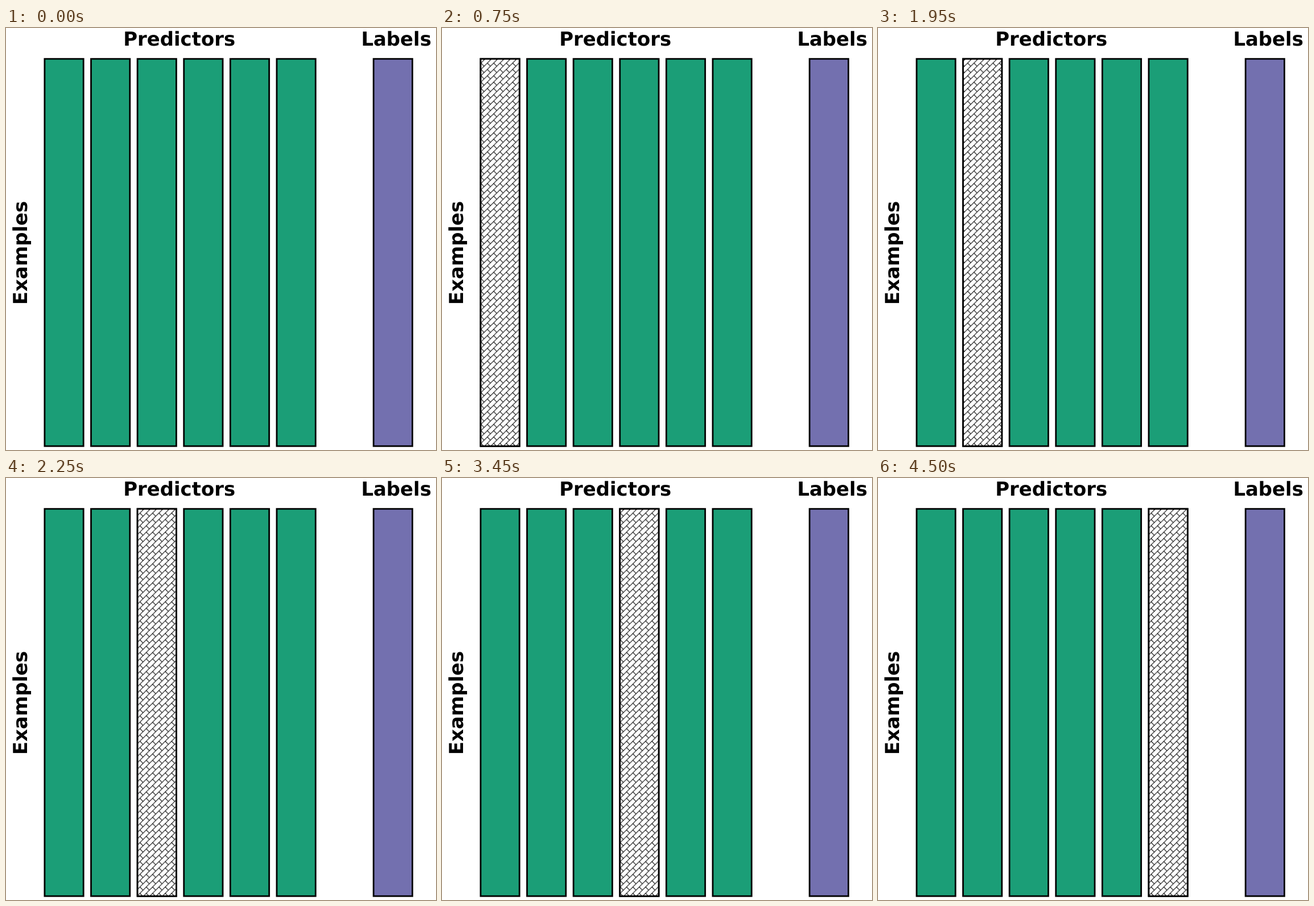
An HTML page for the animation above (5250 ms loop, 756 by 741 pixels).

```html
<!DOCTYPE html>
<html lang="en">
<head>
<meta charset="utf-8">
<title>Predictors and labels</title>
<style>
  html, body { margin: 0; width: 100%; height: 100%; overflow: hidden; background: #fff; }
  svg { display: block; width: 756px; height: 741px; }
  text { font: bold 33.9px "DejaVu Sans", sans-serif; text-rendering: geometricPrecision; }
  .bar { stroke: #000; stroke-width: 2.8; stroke-linejoin: miter; }
  .hatch { opacity: 0; }
</style>
</head>
<body>
<svg viewBox="0 0 756 741">
  <defs>
    <!-- Diagonal brick: full rising diagonal, half falling diagonal -->
    <pattern id="brick" width="8" height="8" patternUnits="userSpaceOnUse"
             patternTransform="translate(152 56) scale(1.391)">
      <rect width="8" height="8" fill="#fff"/>
      <path d="M-1 9L9 -1M-1 1L1 -1M7 9L9 7M4 4L8 8" fill="none" stroke="#000" stroke-width=".8"/>
    </pattern>
  </defs>
  <text x="206.2" y="30.8">Predictors</text>
  <text x="624.4" y="30.8">Labels</text>
  <text transform="translate(36.8 486) rotate(-90)">Examples</text>
  <g id="bars"></g>
</svg>
<script>
  const STEP = 750, COUNT = 6, STEPS = COUNT + 1;
  const bars = document.getElementById('bars');

  function addBar(x, fill, name = 'bar') {
    const rect = document.createElementNS(bars.namespaceURI, 'rect');
    const attrs = { x, y: 54.2, width: 68.3, height: 680, fill, class: name };
    for (const key in attrs) rect.setAttribute(key, attrs[key]);
    bars.append(rect);
    return rect;
  }

  for (let i = 0; i < COUNT; i++) {
    const x = 67.9 + i * 81.62;
    addBar(x, '#1b9e77');
    const frames = Array.from({ length: STEPS + 1 }, (_, k) => ({
      opacity: k === i + 1 ? 1 : 0,
      offset: k / STEPS,
      easing: 'step-end'
    }));
    addBar(x, 'url(#brick)', 'bar hatch')
      .animate(frames, { duration: STEP * STEPS, iterations: Infinity });
  }
  addBar(646.2, '#7370af');
</script>
</body>
</html>
```
